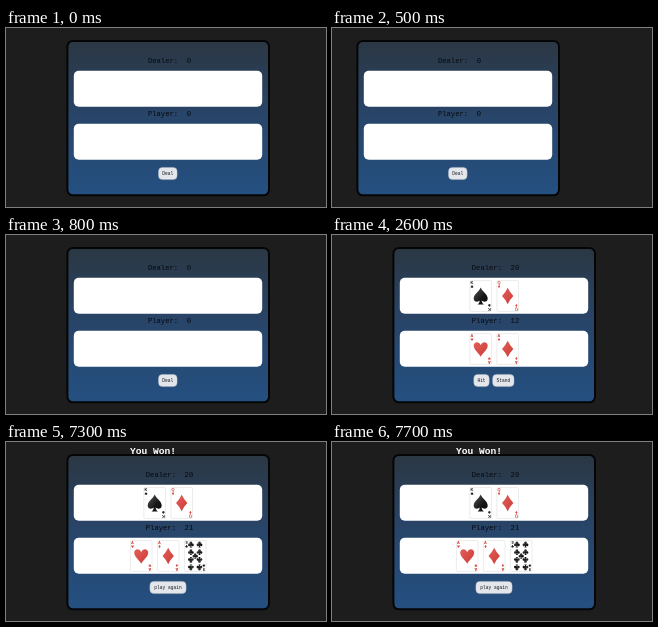
An HTML page for the animation above (8 s loop, 320x179 px).

```html
<!DOCTYPE html>
<html lang="en">
<head>
<meta charset="utf-8">
<title>Blackjack</title>
<style>
  html, body { margin: 0; width: 100%; height: 100%; overflow: hidden; background: #1d1d1d; }
  svg { display: block; width: 100%; height: 100%; }
  text { font-family: "Liberation Mono", monospace; text-anchor: middle; white-space: pre; }
  .score { font-size: 7.2px; fill: #05080d; }
  .label { font-size: 4.55px; fill: #15181c; }
  .title { font-size: 9.6px; font-weight: bold; fill: #fff; }
  .rank { font-family: "Liberation Sans", sans-serif; font-size: 3.9px; font-weight: bold; }
</style>
</head>
<body>
<svg viewBox="0 0 320 179">
  <defs>
    <linearGradient id="felt" x2="0" y2="1">
      <stop offset="0" stop-color="#2b3743"/>
      <stop offset=".5" stop-color="#28456a"/>
      <stop offset="1" stop-color="#245081"/>
    </linearGradient>
    <linearGradient id="red" x2="1" y2="1">
      <stop offset="0" stop-color="#e0605a"/>
      <stop offset="1" stop-color="#cf3a35"/>
    </linearGradient>
    <linearGradient id="black" x2="1" y2="1">
      <stop offset="0" stop-color="#555"/>
      <stop offset=".6" stop-color="#161616"/>
      <stop offset="1" stop-color="#0c0c0c"/>
    </linearGradient>
  </defs>
  <rect width="320" height="179" fill="#1d1d1d"/>
  <text class="title" id="title" x="147" y="12">You Won!</text>
  <g id="table">
    <rect x="61.4" y="12.9" width="201.6" height="154.4" rx="5.5" fill="url(#felt)" stroke="#040506" stroke-width="2"/>
    <text class="score" id="dealer" x="163.5" y="35"></text>
    <text class="score" id="player" x="163.5" y="88"></text>
    <rect x="67.8" y="42.8" width="188.4" height="36" rx="5" fill="#fff"/>
    <rect x="67.8" y="95.8" width="188.4" height="36" rx="5" fill="#fff"/>
    <g id="dealerHand"></g>
    <g id="playerHand"></g>
    <g id="buttons"></g>
  </g>
</svg>
<script>
const LOOP = 8000;
const $ = id => document.getElementById(id);

// Suit outlines in a box of about 2 by 2 around the origin
const SUITS = {
  spade: ['black', 'M0-1.2C.25-.6 1 -.2 1 .35C1 .85 .4 .95 .12 .6Q.15 1 .45 1.2H-.45Q-.15 1-.12 .6C-.4 .95-1 .85-1 .35C-1-.2-.25-.6 0-1.2Z'],
  diamond: ['red', 'M0-1.3Q.35-.55 .9 0Q.35 .55 0 1.3Q-.35 .55-.9 0Q-.35-.55 0-1.3Z'],
  heart: ['red', 'M0 1.1C-.2 .65-1 .15-1-.45C-1-1.1-.2-1.15 0-.55C.2-1.15 1-1.1 1-.45C1 .15 .2 .65 0 1.1Z'],
  club: ['black', 'M-.12 .3C-.35 .75-1 .6-1 .1C-1-.3-.6-.45-.35-.3C-.65-.6-.4-1.05 0-1.05S.65-.6 .35-.3C.6-.45 1-.3 1 .1C1 .6 .35 .75 .12 .3Q.15 .8 .45 1H-.45Q-.15 .8-.12 .3Z']
};

function pip(suit, x, y, size, turn = 0) {
  const [ink, d] = SUITS[suit];
  return `<path transform="translate(${x} ${y}) rotate(${turn}) scale(${size})" d="${d}" fill="url(#${ink})"/>`;
}

function pips(rank, suit) {
  if (rank !== '9') return pip(suit, 0, 0, suit === 'diamond' ? 6.3 : 7);
  let out = pip(suit, 0, 0, 2.7);
  for (let row = 0; row < 4; row++)
    for (const x of [-4.3, 4.3])
      out += pip(suit, x, (row - 1.5) * 7.6, 2.9, row > 1 ? 180 : 0);
  return out;
}

function card(rank, suit, x, y) {
  const ink = SUITS[suit][0] === 'red' ? '#cf3a35' : '#111';
  const corner = `<text class="rank" x="-8.7" y="-11.6" fill="${ink}">${rank}</text>` + pip(suit, -8.7, -9.5, 1.35);
  return `<g transform="translate(${x} ${y})">
    <rect x="-10.8" y="-15.4" width="21.6" height="30.8" rx="1" fill="#fff" stroke="#d9d9d9" stroke-width=".5"/>
    ${pips(rank, suit)}${corner}<g transform="rotate(180)">${corner}</g></g>`;
}

const hand = (cards, y) => cards.map(([rank, suit], i) =>
  card(rank, suit, 162.2 + (i - (cards.length - 1) / 2) * 27, y)).join('');

const button = (name, x, width) =>
  `<rect x="${x}" y="139.4" width="${width}" height="12.2" rx="4" fill="#e3e6ea" stroke="#b9c0c8" stroke-width=".4"/>
   <text class="label" x="${x + width / 2}" y="147">${name}</text>`;

const DEALER = [['K', 'spade'], ['Q', 'diamond']];
const PLAYER = [['A', 'heart'], ['A', 'diamond'], ['9', 'club']];
const DEAL = button('Deal', 152.5, 18.6);
const PLAY = button('Hit', 141.8, 15.4) + button('Stand', 160.6, 21.4);
const AGAIN = button('play again', 143.9, 36.2);

// [start, dealer score, player score, dealer cards, player cards, buttons]
const STATES = [
  [0, 0, 0, 0, 0, DEAL],
  [2400, 20, 12, 0, 0, PLAY],
  [2500, 20, 12, 2, 1, PLAY],
  [2600, 20, 12, 2, 2, PLAY],
  [7300, 20, 21, 2, 3, AGAIN]
];

let shown;
function draw(t) {
  $('table').setAttribute('transform', `translate(${t >= 500 && t < 800 ? -36 : 0} 0)`);
  const state = STATES.findLast(s => t >= s[0]);
  if (state === shown) return;
  shown = state;
  const [start, dealer, player, dealt, drawn, buttons] = state;
  $('dealer').textContent = `Dealer:\u00a0\u00a0${dealer}`;
  $('player').textContent = `Player:\u00a0\u00a0${player}`;
  $('dealerHand').innerHTML = hand(DEALER.slice(0, dealt), 61);
  $('playerHand').innerHTML = hand(PLAYER.slice(0, drawn), 114);
  $('buttons').innerHTML = buttons;
  $('title').style.display = start === 7300 ? '' : 'none';
}

const origin = performance.now();
function tick() {
  draw((performance.now() - origin) % LOOP);
  requestAnimationFrame(tick);
}
tick();
</script>
</body>
</html>
```
